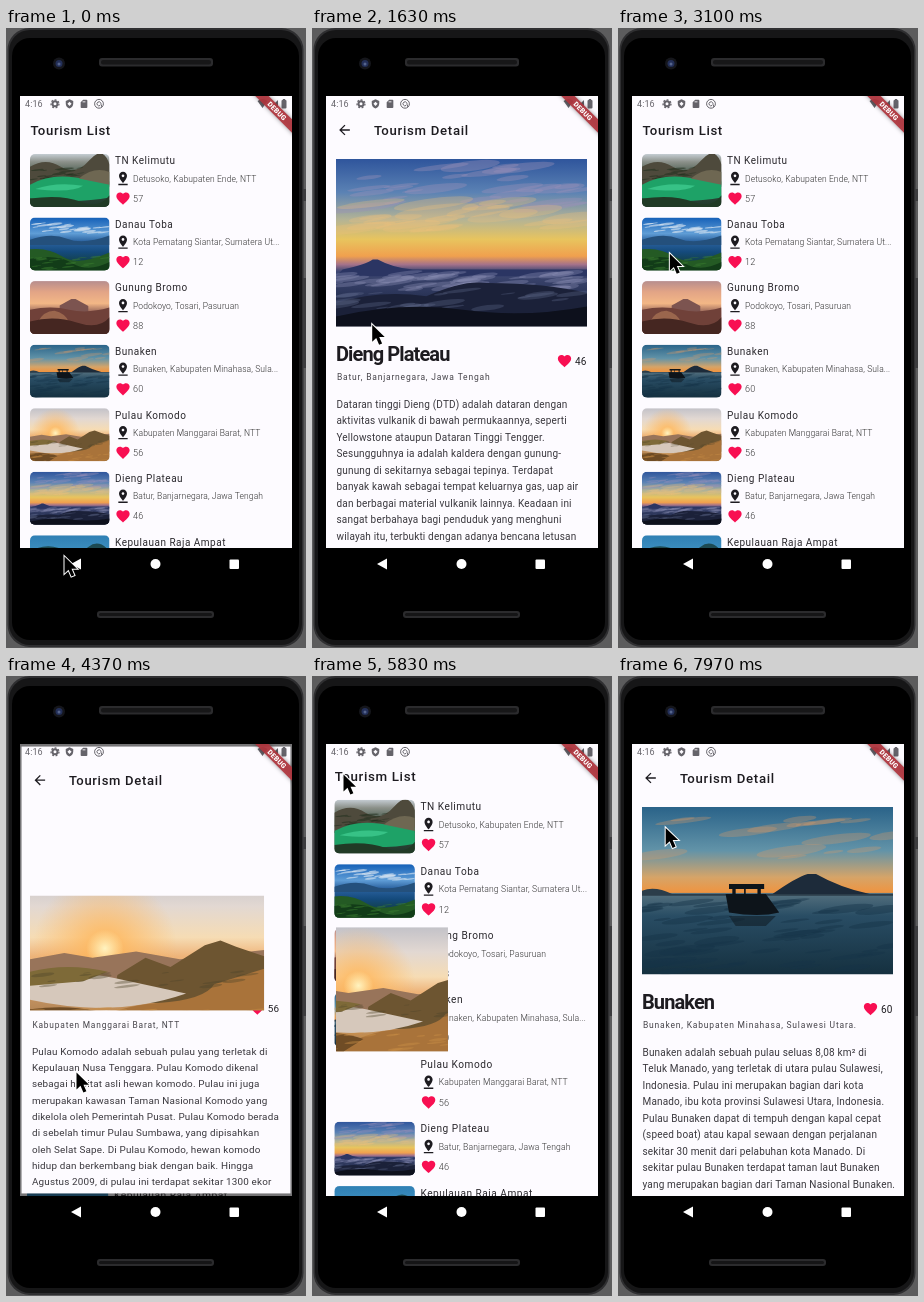
An HTML page with a canvas for the animation above (8000 ms loop, 300 by 620 pixels).

```html
<!DOCTYPE html>
<html lang="id">
<head>
<meta charset="utf-8">
<title>Tourism app</title>
<style>
  html, body { margin: 0; width: 100%; height: 100%; overflow: hidden; background: #5c5c5d; }
  canvas { display: block; width: 300px; height: 620px; }
</style>
</head>
<body>
<canvas id="stage"></canvas>
<script>
const LOOP = 8000, FLIGHT = 350;
const canvas = document.getElementById('stage');
const ctx = canvas.getContext('2d');
const density = window.devicePixelRatio || 1;
canvas.width = 300 * density;
canvas.height = 620 * density;

const SCREEN = { x: 14, y: 68, w: 272, h: 452 };
const BIG = { x: 24, y: 131, w: 251, h: 167.5 };
const PAPER = '#fdfbff', INK = '#1d1b20';
const thumbRect = i => ({ x: 24, y: 126 + 63.55 * i, w: 79.5, h: 53 });

const ICONS = {
  heart: new Path2D('M12 21.35l-1.45-1.32C5.4 15.36 2 12.28 2 8.5 2 5.42 4.42 3 7.5 3c1.74 0 3.41.81 4.5 2.09C13.09 3.81 14.76 3 16.5 3 19.58 3 22 5.42 22 8.5c0 3.78-3.4 6.86-8.55 11.54L12 21.35z'),
  pin: new Path2D('M18 8c0-3.31-2.69-6-6-6S6 4.69 6 8c0 4.5 6 11 6 11s6-6.5 6-11zm-8 0c0-1.1.9-2 2-2s2 .9 2 2-.89 2-2 2-2-.9-2-2zM5 20v2h14v-2H5z'),
  back: new Path2D('M20 11H7.83l5.59-5.59L12 4l-8 8 8 8 1.41-1.41L7.83 13H20v-2z'),
  shield: new Path2D('M12 1L3 5v6c0 5.5 3.8 10.7 9 12 5.2-1.3 9-6.5 9-12V5zM12 7l5 5-5 5-5-5z'),
  card: new Path2D('M18 2h-8L4 8v12c0 1.1.9 2 2 2h12c1.1 0 2-.9 2-2V4c0-1.1-.9-2-2-2zM9 5v4h2V5zM13 5v4h2V5z')
};

// Scenes are painted in a 150 x 100 space.
function sky(...stops) {
  const g = ctx.createLinearGradient(0, 0, 0, 100);
  stops.forEach(([at, color]) => g.addColorStop(at, color));
  ctx.fillStyle = g;
  ctx.fillRect(0, 0, 150, 100);
}
function shape(color, d) {
  ctx.fillStyle = color;
  ctx.fill(new Path2D(d));
}
// color is a six-digit hex value
function glow(x, y, r, color) {
  const g = ctx.createRadialGradient(x, y, 0, x, y, r);
  g.addColorStop(0, color);
  g.addColorStop(1, color + '00');
  ctx.fillStyle = g;
  ctx.fillRect(0, 0, 150, 100);
}
// Flat seeded streaks of cloud, foam or scrub between two heights.
function streaks(color, count, top, bottom, width, seed) {
  const random = () => (seed = seed * 16807 % 2147483647) / 2147483647;
  ctx.fillStyle = color;
  for (let i = 0; i < count; i++) {
    const w = width * (.4 + random());
    ctx.beginPath();
    ctx.ellipse(150 * random(), mix(top, bottom, random()), w, w * (.08 + .1 * random()), -.12, 0, 7);
    ctx.fill();
  }
}

const scenes = {
  kelimutu() {
    sky([0, '#c4ccd2'], [.15, '#8b9089'], [.4, '#3f5546'], [1, '#20382c']);
    shape('#4e4a3c', 'M0 24Q30 6 58 24T112 12T150 20V62H0z');
    streaks('#23301f90', 24, 24, 50, 12, 5);
    shape('#1ea267', 'M0 58Q36 38 82 44T150 52V82Q90 94 0 84z');
    shape('#37c286', 'M10 66Q50 52 100 60Q80 74 10 66z');
    shape('#213a26', 'M0 84Q60 76 96 90T150 78V100H0z');
    shape('#6e6752', 'M92 46Q122 22 150 34V58z');
  },
  toba() {
    sky([0, '#1560b8'], [.3, '#5f9dd6'], [.45, '#2c63a0'], [.65, '#144a7c'], [1, '#12391f']);
    streaks('#dce8f2a0', 22, 8, 30, 13, 9);
    shape('#24507c', 'M0 42Q40 28 70 40T150 34V52H0z');
    shape('#245a24', 'M0 60Q34 56 62 74T150 66V100H0z');
    shape('#123c18', 'M0 78Q50 68 80 86T150 84V100H0z');
    streaks('#3d803080', 20, 72, 98, 9, 3);
  },
  bromo() {
    sky([0, '#b78e8e'], [.2, '#e2a486'], [.42, '#f3b786'], [.6, '#8f5f56'], [1, '#3a201d']);
    shape('#7c5450', 'M56 46L78 34H86L110 47V60H56z');
    shape('#704139', 'M0 54Q40 46 74 54T150 50V100H0z');
    shape('#9a664d', 'M14 78Q26 56 46 56Q66 60 74 78z');
    shape('#452621', 'M0 76Q46 64 88 78T150 68V100H0z');
  },
  bunaken() {
    sky([0, '#2a6389'], [.26, '#6293a8'], [.42, '#d6a468'], [.51, '#ef9440'], [.515, '#54707e'], [.65, '#294d64'], [1, '#15303f']);
    streaks('#d99a6650', 16, 6, 30, 15, 21);
    streaks('#16344870', 60, 56, 98, 12, 8);
    shape('#1d2b3a', 'M78 52Q92 42 99 40H104Q118 48 136 52z');
    shape('#2b3d4a', 'M0 50Q8 47 18 52H150V53H0z');
    shape('#0d141a', 'M50 52H74L82 63Q70 66 52 63zM52 46H73V49H52zM54 48H56V56H54zM69 48H71V56H69zM61 48H62V56H61z');
    shape('#0d141a80', 'M52 65H80L74 71H56z');
  },
  komodo() {
    sky([0, '#c3c2c8'], [.2, '#e2d8d2'], [.4, '#f6dcb4'], [.52, '#eeb47a'], [1, '#a0764a']);
    glow(48, 46, 46, '#ffb65a');
    glow(48, 47, 12, '#fff3c0');
    shape('#98745a', 'M0 54L22 50L40 53L68 49L96 54L150 48V70H0z');
    shape('#6d5531', 'M56 64L74 53L90 59L112 45L122 42L132 46L150 52V82H52z');
    shape('#d6c8bb', 'M0 68Q26 60 54 66T100 76Q54 92 0 80z');
    shape('#7e6a38', 'M0 62Q24 56 50 62L34 68L0 71z');
    shape('#a9733a', 'M30 100Q52 84 82 82T118 70L150 60V100z');
    shape('#6f4c25', 'M0 86Q30 82 52 90L36 100H0z');
    streaks('#c98d4670', 26, 86, 99, 7, 4);
    streaks('#4a432a60', 18, 62, 72, 6, 12);
  },
  dieng() {
    sky([0, '#2f559c'], [.2, '#5b82b4'], [.36, '#b3b396'], [.48, '#e8c45e'], [.58, '#f0a04e'], [.63, '#a4728a'], [.67, '#3f4873'], [.8, '#2c365a'], [1, '#0e111d']);
    streaks('#9a8fb860', 30, 4, 30, 16, 17);
    streaks('#f0c07a48', 24, 26, 44, 18, 33);
    shape('#2b3563', 'M4 66Q18 63 22 60H25Q34 65 46 66H150V70H0z');
    streaks('#8f92b858', 50, 68, 78, 9, 7);
    shape('#1b2139', 'M0 86Q26 78 54 82Q76 72 90 74Q126 74 150 80V100H0z');
    streaks('#6c749a48', 26, 78, 92, 9, 41);
    shape('#0d101c', 'M0 94Q40 85 76 90T150 88V100H0z');
  },
  raja() {
    sky([0, '#2f7fb4'], [.3, '#3d8fc0'], [1, '#12506c']);
    shape('#1d4a52', 'M0 30Q30 14 60 26T110 22T150 30V60H0z');
  }
};

const places = [
  { name: 'TN Kelimutu', address: 'Detusoko, Kabupaten Ende, NTT', likes: 57, scene: 'kelimutu' },
  { name: 'Danau Toba', address: 'Kota Pematang Siantar, Sumatera Ut...', likes: 12, scene: 'toba' },
  { name: 'Gunung Bromo', address: 'Podokoyo, Tosari, Pasuruan', likes: 88, scene: 'bromo' },
  { name: 'Bunaken', address: 'Bunaken, Kabupaten Minahasa, Sula...', likes: 60, scene: 'bunaken',
    fullAddress: 'Bunaken, Kabupaten Minahasa, Sulawesi Utara.',
    story: ['Bunaken adalah sebuah pulau seluas 8,08 km² di', 'Teluk Manado, yang terletak di utara pulau Sulawesi,',
      'Indonesia. Pulau ini merupakan bagian dari kota', 'Manado, ibu kota provinsi Sulawesi Utara, Indonesia.',
      'Pulau Bunaken dapat di tempuh dengan kapal cepat', '(speed boat) atau kapal sewaan dengan perjalanan',
      'sekitar 30 menit dari pelabuhan kota Manado. Di', 'sekitar pulau Bunaken terdapat taman laut Bunaken',
      'yang merupakan bagian dari Taman Nasional Bunaken.'] },
  { name: 'Pulau Komodo', address: 'Kabupaten Manggarai Barat, NTT', likes: 56, scene: 'komodo',
    story: ['Pulau Komodo adalah sebuah pulau yang terletak di', 'Kepulauan Nusa Tenggara. Pulau Komodo dikenal',
      'sebagai habitat asli hewan komodo. Pulau ini juga', 'merupakan kawasan Taman Nasional Komodo yang',
      'dikelola oleh Pemerintah Pusat. Pulau Komodo berada', 'di sebelah timur Pulau Sumbawa, yang dipisahkan',
      'oleh Selat Sape. Di Pulau Komodo, hewan komodo', 'hidup dan berkembang biak dengan baik. Hingga',
      'Agustus 2009, di pulau ini terdapat sekitar 1300 ekor'] },
  { name: 'Dieng Plateau', address: 'Batur, Banjarnegara, Jawa Tengah', likes: 46, scene: 'dieng',
    story: ['Dataran tinggi Dieng (DTD) adalah dataran dengan', 'aktivitas vulkanik di bawah permukaannya, seperti',
      'Yellowstone ataupun Dataran Tinggi Tengger.', 'Sesungguhnya ia adalah kaldera dengan gunung-',
      'gunung di sekitarnya sebagai tepinya. Terdapat', 'banyak kawah sebagai tempat keluarnya gas, uap air',
      'dan berbagai material vulkanik lainnya. Keadaan ini', 'sangat berbahaya bagi penduduk yang menghuni',
      'wilayah itu, terbukti dengan adanya bencana letusan'] },
  { name: 'Kepulauan Raja Ampat', address: '', likes: 0, scene: 'raja' }
];

const flights = [
  { at: -FLIGHT, place: 5, opens: false },
  { at: 845, place: 5, opens: true },
  { at: 2420, place: 5, opens: false },
  { at: 4210, place: 4, opens: true },
  { at: 5692, place: 4, opens: false },
  { at: 7150, place: 3, opens: true }
];
const clicks = [640, 2230, 4010, 5490, 6940], CLICK_LENGTH = 190;
const pointerStops = [
  [0, 58, 528], [100, 58, 528], [600, 78, 459], [1300, 78, 459], [2000, 38, 103], [2700, 38, 103],
  [3600, 70, 396], [4700, 70, 396], [5500, 31, 98], [6000, 31, 98], [6750, 71, 346], [7400, 71, 346], [8000, 47, 150]
];

const clamp = v => Math.min(1, Math.max(0, v));
const mix = (a, b, p) => a + (b - a) * p;

// cubic-bezier(.4, 0, .2, 1)
function ease(t) {
  if (t <= 0 || t >= 1) return clamp(t);
  let lo = 0, hi = 1, u;
  for (let i = 0; i < 20; i++) {
    u = (lo + hi) / 2;
    const x = 1.2 * u * (1 - u) ** 2 + .6 * u * u * (1 - u) + u ** 3;
    if (x < t) lo = u; else hi = u;
  }
  return 3 * u * u * (1 - u) + u ** 3;
}

function scoped(draw) {
  ctx.save();
  draw();
  ctx.restore();
}
function text(str, x, y, size, { weight = 400, spacing = 0, color = INK, align = 'left' } = {}) {
  ctx.font = `${weight} ${size}px Roboto, "Open Sans", sans-serif`;
  ctx.letterSpacing = spacing + 'px';
  ctx.textAlign = align;
  ctx.fillStyle = color;
  ctx.fillText(str, x, y);
}
function icon(name, cx, cy, color, size = 16) {
  scoped(() => {
    ctx.translate(cx - size / 2, cy - size / 2);
    ctx.scale(size / 24, size / 24);
    ctx.fillStyle = color;
    ctx.fill(ICONS[name], 'evenodd');
  });
}
function box(x, y, w, h, r, color) {
  ctx.beginPath();
  ctx.roundRect(x, y, w, h, r);
  ctx.fillStyle = color;
  ctx.fill();
}
function disc(x, y, r, color) {
  ctx.beginPath();
  ctx.arc(x, y, r, 0, 7);
  ctx.fillStyle = color;
  ctx.fill();
}
function picture(scene, { x, y, w, h }, radius = 0) {
  scoped(() => {
    ctx.beginPath();
    ctx.roundRect(x, y, w, h, radius);
    ctx.clip();
    const s = Math.max(w / 150, h / 100);
    ctx.translate(x + w / 2, y + h / 2);
    ctx.scale(s, s);
    ctx.translate(-75, -50);
    scenes[scene]();
  });
}
function page(scale, alpha, draw) {
  scoped(() => {
    ctx.globalAlpha = alpha;
    ctx.translate(150, 294);
    ctx.scale(scale, scale);
    ctx.translate(-150, -294);
    ctx.fillStyle = PAPER;
    ctx.fillRect(SCREEN.x, SCREEN.y, SCREEN.w, SCREEN.h);
    draw();
  });
}

function drawList(hidden) {
  text('Tourism List', 24.5, 107, 13.2, { weight: 500, spacing: .63 });
  places.forEach((place, i) => {
    const thumb = thumbRect(i), y = thumb.y;
    if (i !== hidden) picture(place.scene, thumb, 5);
    text(place.name, 109, y + 10.3, 10, { spacing: .5, color: '#2b292e' });
    icon('pin', 117, y + 24.5, INK);
    text(place.address, 127, y + 27.7, 8.5, { weight: 300, spacing: .12, color: '#333' });
    icon('heart', 117, y + 44.5, '#f80f52');
    text(place.likes, 127, y + 47.7, 9, { weight: 300, spacing: .2, color: '#333' });
  });
}
function drawDetail(place, showPicture) {
  icon('back', 32.5, 102, INK);
  text('Tourism Detail', 62, 107, 13.2, { weight: 500, spacing: .7 });
  if (showPicture) picture(place.scene, BIG);
  text(place.name, 24, 333, 20, { weight: 600, spacing: -.9 });
  text(place.fullAddress || place.address, 25, 352.3, 8.5, { spacing: .8, color: '#47454b' });
  icon('heart', 252.5, 333, '#f80f52');
  text(place.likes, 263, 336.8, 10, { spacing: .2 });
  place.story.forEach((line, i) => text(line, 24.5, 379.5 + 16.55 * i, 10, { spacing: .17, color: '#3a383e' }));
}

// Corners of the flying picture travel on an arc: width leads, height follows.
function flyingRect(from, to, e) {
  const angle = e * Math.PI / 2, rest = Math.max(0, Math.cos(angle));
  const right = mix(from.x + from.w, to.x + to.w, Math.sin(angle));
  const top = mix(from.y, to.y, 1 - rest ** 1.23);
  const bottom = mix(from.y + from.h, to.y + to.h, 1 - rest ** 1.58);
  return { x: 24, y: top, w: right - 24, h: bottom - top };
}

function drawStatus() {
  const gray = '#65636a';
  text('4:16', 19, 79.3, 9, { color: gray, spacing: .1 });
  ctx.strokeStyle = gray;
  ctx.lineWidth = 2;
  ctx.beginPath();
  ctx.arc(49, 75.8, 2.5, 0, 7);
  ctx.stroke();
  ctx.lineWidth = 1.3;
  ctx.setLineDash([1.8, 1.8]);
  ctx.beginPath();
  ctx.arc(49, 75.8, 4, 0, 7);
  ctx.stroke();
  ctx.setLineDash([]);
  icon('shield', 63.5, 75.8, gray, 10);
  icon('card', 78, 75.8, gray, 10);
  ctx.lineWidth = 1;
  ctx.beginPath();
  ctx.arc(93, 75.8, 4.4, 0, 7);
  ctx.stroke();
  ctx.beginPath();
  ctx.arc(93, 75.8, 2, 1, 6.5);
  ctx.lineTo(96, 79);
  ctx.stroke();
  shape(gray, 'M251.5 73Q256.5 69 261.5 73L256.5 80zM264 80L272 72V80z');
  box(275.5, 72, 5, 8.5, 1, gray);
  box(276.8, 71, 2.4, 2, 0, gray);
}
function drawBanner() {
  scoped(() => {
    ctx.translate(286, 68);
    ctx.rotate(Math.PI / 4);
    ctx.shadowColor = '#0007';
    ctx.shadowBlur = 4 * density;
    ctx.fillStyle = '#b3353ee8';
    ctx.fillRect(-45, 16.5, 90, 9.5);
    ctx.shadowColor = 'transparent';
    text('DEBUG', 0, 23.8, 7, { weight: 900, spacing: .2, color: '#fff', align: 'center' });
  });
}

function drawPhone() {
  ctx.fillStyle = '#5c5c5d';
  ctx.fillRect(0, 0, 300, 620);
  box(1.5, 0, 296, 619, 22, '#2f2f31');
  box(3, 2, 293, 615, 21, '#161617');
  box(6, 10, 287, 602, 18, '#000');
  box(297, 161, 3, 12, 0, '#3c3c3e');
  box(297, 250, 3, 90, 0, '#3c3c3e');
  box(93, 30, 114, 8.5, 3, '#2b2b2d');
  box(95, 32, 110, 4.5, 2, '#171718');
  box(91, 583, 117, 7, 3, '#2b2b2d');
  box(93, 585, 113, 3, 1.5, '#151516');
  disc(53, 35.5, 6, '#15161b');
  disc(53, 35.5, 3.5, '#232f58');
  disc(53, 36, 1.5, '#55648c');
  shape('#fff', 'M65 536L75 530.5V541.5z');
  disc(149.5, 536, 5, '#fff');
  box(223.5, 531.5, 9.5, 9.5, 1, '#fff');
}

function drawPointer(t) {
  const i = pointerStops.findIndex(stop => stop[0] > t);
  const [t0, x0, y0] = pointerStops[i - 1], [t1, x1, y1] = pointerStops[i];
  const p = (t - t0) / (t1 - t0), s = p * p * (3 - 2 * p);
  const x = mix(x0, x1, s), y = mix(y0, y1, s);
  if (clicks.some(c => t >= c && t < c + CLICK_LENGTH)) {
    ctx.beginPath();
    ctx.arc(x, y + 1.5, 27.5, 0, 7);
    ctx.lineWidth = 4.5;
    ctx.strokeStyle = '#fffc';
    ctx.stroke();
    ctx.lineWidth = 2.4;
    ctx.strokeStyle = '#080808';
    ctx.stroke();
  }
  scoped(() => {
    ctx.translate(x, y);
    const arrow = new Path2D('M.5 .5V17.5L4.5 13.8L7.4 20.5L10.4 19.2L7.5 12.7H13z');
    ctx.lineWidth = 2;
    ctx.strokeStyle = '#fff';
    ctx.stroke(arrow);
    ctx.fillStyle = '#000';
    ctx.fill(arrow);
  });
}

function drawScreen(t) {
  const { at, place, opens } = flights.findLast(f => f.at <= t);
  const e = ease((t - at) / FLIGHT), flying = e < 1;
  const { x, y, w, h } = SCREEN;
  ctx.beginPath();
  ctx.rect(x, y, w, h);
  ctx.clip();
  if (flying || !opens) {
    page(opens ? 1 + .033 * e : 1.033 - .033 * e, 1, () => drawList(flying ? place : -1));
  }
  if (flying && opens) {
    ctx.fillStyle = `rgba(0,0,0,${.75 * e})`;
    ctx.fillRect(x, y, w, h);
  }
  if (flying || opens) {
    page(opens ? .96 + .04 * e : 1 - .05 * e, clamp(opens ? e * 4 : 1 - e * 3), () => drawDetail(places[place], !flying));
  }
  drawStatus();
  if (flying) {
    const thumb = thumbRect(place);
    picture(places[place].scene, opens ? flyingRect(thumb, BIG, e) : flyingRect(BIG, thumb, e));
  }
  drawBanner();
}

function render(now) {
  const t = now % LOOP;
  ctx.setTransform(density, 0, 0, density, 0, 0);
  drawPhone();
  scoped(() => drawScreen(t));
  drawPointer(t);
}

let start;
function tick(now) {
  start ??= now;
  render(Math.max(0, now - start));
  requestAnimationFrame(tick);
}
render(0);
requestAnimationFrame(tick);
</script>
</body>
</html>
```
